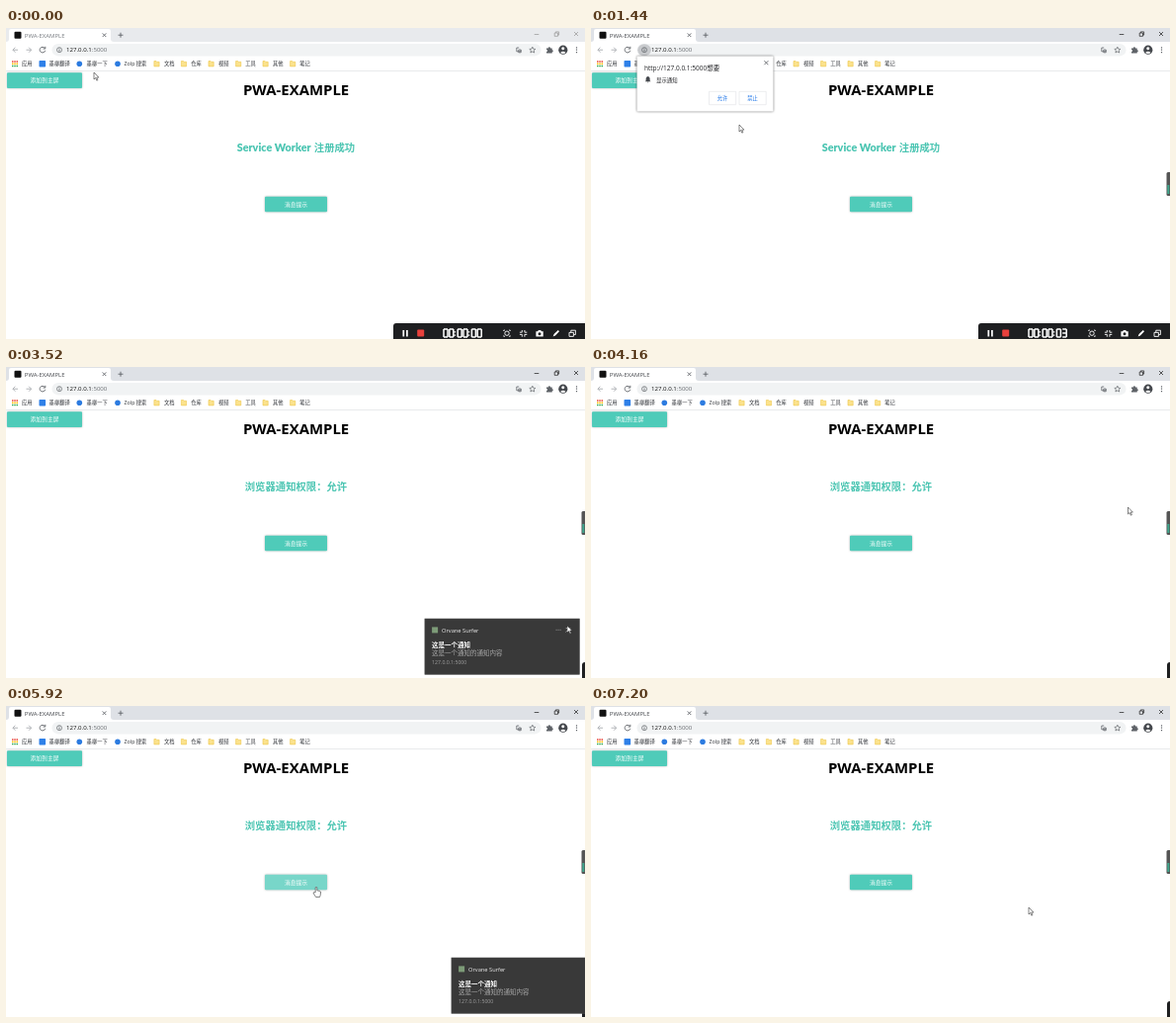
An HTML page that plays this animation: 586x315 px, repeating every 7360 ms.

```html
<!DOCTYPE html>
<html lang="zh">
<head>
<meta charset="utf-8">
<style>
html, body { margin: 0; width: 586px; height: 315px; overflow: hidden; background: #fff; }
svg { display: block; }
text { font-family: "Open Sans", "Noto Sans CJK SC", "Noto Sans CJK", sans-serif; white-space: pre; }
.mid { text-anchor: middle; }
.bold { font-weight: 700; }
.line { fill: none; stroke: #5f6368; stroke-width: .9; }
.btn { fill: #4fcbb9; filter: drop-shadow(0 .5px 1.2px #0004); }
.btn.hover { fill: #78d6c9; }
.status { fill: #4bc5b2; font-size: 10.35px; font-weight: 700; }
.label { fill: #fff; font-size: 5.8px; font-weight: 500; text-anchor: middle; }
.white { fill: none; stroke: #fff; stroke-width: 1; }
</style>
</head>
<body>
<svg width="586" height="315" viewBox="0 0 586 315">
  <!-- tab strip -->
  <rect id="strip" width="586" height="14"/>
  <path d="M0 14q3 0 3-3V3q0-2 2-2h99q2 0 2 2v8q0 3 3 3z" fill="#fff"/>
  <rect x="8.5" y="3.7" width="7" height="7" rx="1" fill="#111"/>
  <text id="tabTitle" x="18.8" y="9.5" font-size="6">PWA-EXAMPLE</text>
  <path class="line" d="M97.7 5.4l3.6 3.6m0-3.6l-3.6 3.6M113.5 7.2h5m-2.5-2.5v5"/>
  <path id="winButtons" class="line" style="stroke-width:.8" d="M534.7 6.5h4.6M555.2 5h3.3v3.3h-3.3zm1.2 0V3.9h3.2v3.2h-1.1M575 4l4 4m0-4l-4 4"/>

  <!-- toolbar -->
  <path class="line" style="stroke:#a9acb0" d="M12 22.2H7m2.4-2.5L6.9 22.2l2.5 2.5M20.5 22.2h5m-2.4-2.5l2.5 2.5-2.5 2.5"/>
  <path class="line" d="M39.2 20.4a2.8 2.8 0 1 0 .5 2.4M39.8 18.8v2.2h-2.2"/>
  <rect x="46.5" y="16" width="495" height="12.4" rx="6.2" fill="#f1f3f4"/>
  <ellipse id="infoHalo" cx="54" cy="22.2" rx="6.8" ry="6" fill="#c8cacd"/>
  <circle class="line" cx="54" cy="22.2" r="2.5" style="stroke-width:.7"/>
  <path class="line" d="M54 21.8v1.9m0-3.2v.7"/>
  <text x="61" y="24.4" font-size="6.1" fill="#111">127.0.0.1<tspan fill="#6b6f74">:5000</tspan></text>
  <ellipse id="installHalo" cx="519" cy="22.2" rx="7" ry="5.6" fill="#c8cacd"/>
  <path class="line" style="stroke-width:.8" d="M519.2 20h-2.4v3.8h4v-1.2M518.8 22h2.4v2.8h-2.4z"/>
  <path class="line" style="stroke-width:.7" d="M532.8 19.2l.9 2 2.1.2-1.6 1.5.5 2.1-1.9-1.1-1.9 1.1.5-2.1-1.6-1.5 2.1-.2z"/>
  <path d="M547 20.4h1.8a1.1 1.1 0 0 1 2.2 0h1.7v1.8a1.1 1.1 0 0 1 0 2.2v1H547v-1.5a1 1 0 0 0 0-2z" fill="#5f6368"/>
  <circle cx="563.8" cy="22.2" r="4.6" fill="#45484d"/>
  <path d="M563.8 19.2a1.5 1.5 0 1 1-.1 0zM561 25q2.8-2.3 5.6 0-2.8 2-5.6 0" fill="#fff"/>
  <path d="M577.5 19.2v6" stroke="#5f6368" stroke-width="1.2" stroke-dasharray="1.2 1.2"/>

  <g id="bookmarks" font-size="5.3" fill="#303338"></g>
  <path d="M0 43.5h586" stroke="#e3e5e8" stroke-width=".8"/>

  <!-- page -->
  <rect id="addBtn" class="btn" x="1" y="45.3" width="76" height="15.7" rx="1"/>
  <text class="label" x="39" y="55.2">添加到主屏</text>
  <text class="mid bold" x="293.6" y="67.9" font-size="14.95">PWA-EXAMPLE</text>
  <g id="ready" class="status">
    <text x="233.7" y="125.2" style="font:900 10.8px Lato,sans-serif">Service Worker</text>
    <text x="311.8" y="125.2">注册成功</text>
  </g>
  <text id="granted" class="status mid" x="293.5" y="125.2">浏览器通知权限：允许</text>
  <rect id="msgBtn" class="btn" x="262" y="170.8" width="63" height="15.4" rx="1"/>
  <text class="label" x="293.5" y="180.8">消息提示</text>

  <!-- permission prompt -->
  <g id="prompt">
    <rect x="46.5" y="28.5" width="138" height="56" rx="1" fill="#fff" style="filter:drop-shadow(0 .6px 1px #0009)"/>
    <text x="54" y="42.8" font-size="6.5" fill="#202124">http://127.0.0.1:5000想要</text>
    <path class="line" d="M175.4 33.2l4 4m0-4l-4 4"/>
    <path d="M54.8 54.2l.8-1v-2q0-2 2-2.2 2 .2 2 2.2v2l.8 1zM56.8 54.8h1.6l-.8.8z" fill="#45484d"/>
    <text x="66" y="54.6" font-size="5.4" fill="#202124">显示通知</text>
    <path d="M119.5 64.3h27.2v13.4h-27.2zM150 64.3h27.2v13.4H150z" fill="#fff" stroke="#dfe1e5" stroke-width=".6"/>
    <g class="mid" font-size="5.3" fill="#1a73e8"><text x="133" y="73">允许</text><text x="163.6" y="73">禁止</text></g>
  </g>

  <!-- edge handle and recorder -->
  <g id="handle">
    <path d="M586 146h-2q-1.5 0-1.5 1.5v21q0 1.5 1.5 1.5h2z" fill="#555"/>
    <path d="M584.3 159v9" stroke="#3fa78d" stroke-width="2"/>
  </g>
  <g id="recorder">
    <path d="M392 315v-13q0-3 3-3h191v16z" fill="#1e1f21"/>
    <path d="M402.3 306v6.4m3.6-6.4v6.4" stroke="#fff" stroke-width="1.7"/>
    <rect x="416.2" y="305.6" width="7" height="7" rx="1" fill="#e8413c"/>
    <path id="clock" class="white" style="stroke-width:1.5"/>
    <g class="white" style="stroke-width:.9">
      <circle cx="507" cy="309.2" r="2.2"/><path d="M503.8 306v1m0 4.4v1M510.2 306v1m0 4.4v1M503.8 306h1m4.4 0h1m-6.4 6.4h1m4.4 0h1"/>
      <path d="M522.3 306v2.2h-2.4m5-2.2v2.2h2.4m-5 4.6v-2.4h-2.4m5 2.4v-2.4h2.4"/>
      <path d="M570 308.4h4.4v4H570zm1.8-.2v-2h4.6v4.4h-1.8"/>
    </g>
    <path d="M536.4 307.2h1.7l.9-1.2h2.1l.9 1.2h1.7v5.2h-7.3z" fill="#fff"/><circle cx="540" cy="309.7" r="1.5" fill="#1e1f21"/>
    <path d="M553.6 312.4l1-2.4 4.2-4 1.2 1.2-4 4.2z" fill="#fff"/>
  </g>

  <!-- notification, laid out from its left edge -->
  <g id="toast">
    <rect x=".3" y="255" width="156.5" height="56.3" fill="#393939" stroke="#4b4b4b" stroke-width=".6"/>
    <rect x="7.5" y="263.4" width="6" height="6" fill="#7d9b78"/>
    <text x="17.5" y="268.6" font-size="5.7" fill="#eee">Orvane Surfer</text>
    <path id="dots" d="M133 266.3h5" stroke="#999" stroke-width=".9" stroke-dasharray="1 1"/>
    <path id="toastClose" class="line" d="M143.2 264l4.4 4.4m0-4.4l-4.4 4.4"/>
    <text class="bold" x="7.5" y="283.5" font-size="6.5" fill="#fff">这是一个通知</text>
    <text x="7.5" y="292" font-size="6.5" fill="#a8a8a8">这是一个通知的通知内容</text>
    <text x="7.5" y="301.2" font-size="5.2" fill="#a0a0a0">127.0.0.1:5000</text>
  </g>

  <g id="cursor" fill="#fff" stroke="#333" stroke-width=".6" stroke-linejoin="round">
    <path id="arrow" d="M0 0v7l1.6-1.5 1.2 2.7 1.1-.5-1.2-2.6h2.2z"/>
    <path id="hand" d="M-.8 5.8V.8q.8-1.4 1.6 0v3l3 .7q.9.3.8 1.4l-.5 3-.6 1.6H-.4l-2.3-3.6q-.6-1.4.6-1.3z"/>
  </g>
</svg>
<script>
const $ = id => document.getElementById(id);
const LOOP = 7360, STEP = 160;

// [icon, icon centre, text start, label]
const bookmarks = [
  ['grid', 9, 16, '应用'], ['square', 36.8, 43.6, '墨柳翻译'], ['circle', 74.3, 81.6, '墨柳一下'],
  ['circle', 113, 119.6, 'Zolp 搜索'], ['folder', 152.5, 160, '文档'], ['folder', 180, 187.3, '仓库'],
  ['folder', 207.6, 215, '视频'], ['folder', 235.2, 242.3, '工具'], ['folder', 262.6, 270, '其他'],
  ['folder', 290.2, 297.3, '笔记']
];
const icons = {
  grid: ['#ea4335', '#fbbc04', '#34a853'].map((c, i) =>
    `<path d="M-3 ${i * 2.2 - 2.2}h6" stroke="${c}" stroke-width="1.5" stroke-dasharray="1.5 .75"/>`).join(''),
  square: '<rect x="-3.3" y="-3.3" width="6.6" height="6.6" rx=".8" fill="#2f80e8"/>',
  circle: '<circle r="2.8" fill="#2c7be0"/>',
  folder: '<path d="M-2.6-2.7h2.1l.7.8h2.4v4.6h-5.2z" fill="#fbe28c" stroke="#ecc64c" stroke-width=".6"/>'
};
$('bookmarks').innerHTML = bookmarks.map(([icon, cx, x, label]) =>
  `<g transform="translate(${cx} 36.2)">${icons[icon]}</g><text x="${x}" y="38.2">${label}</text>`).join('');

// cursor stops: [time, x, y]
const stops = [
  [0, 89, 45], [160, 89, 45], [640, 293, 180], [800, 293, 180], [1440, 150, 98],
  [1680, 133, 71], [1840, 133, 71], [2080, 141.8, 94], [2400, 141.8, 94], [3360, 568, 262],
  [3840, 568, 262], [4480, 519, 22], [4640, 519, 22], [4960, 522, 92], [5280, 40, 53],
  [5440, 40, 53], [5760, 314, 183], [6080, 314, 183], [6560, 568, 262], [6720, 568, 262],
  [7200, 443, 204], [LOOP, 443, 204]
];
function cursorAt(t) {
  const i = stops.findIndex(s => s[0] > t);
  const [t0, x0, y0] = stops[i - 1], [t1, x1, y1] = stops[i];
  const p = (t - t0) / (t1 - t0), e = p * p * (3 - 2 * p);
  return [x0 + (x1 - x0) * e, y0 + (y1 - y0) * e];
}

// notification visits: [start of entry, start of exit]
const visits = [[1920, 3680], [5760, 6720]];
function toastX(t) {
  const visit = visits.find(([a, b]) => t >= a && t < b + 320);
  if (!visit) return 600;
  const [a, b] = visit, out = Math.max(0, (t - b) / 320);
  return 423.6 + 163 * (Math.exp((a - t) / 89) + out * out);
}

// seven-segment digits
const segs = { a: 'h4', b: 'm4 0v4', c: 'm4 4v4', d: 'm0 8h4', e: 'm0 4v4', f: 'v4', g: 'm0 4h4' };
const digits = ['abcdef', 'bc', 'abged', 'abgcd', 'fgbc', 'afgcd'];
function clockPath(seconds) {
  let x = 443, d = '';
  for (const ch of '00:00:0' + seconds) {
    if (ch === ':') {
      d += `M${x - .2} 307.3v1.2m0 2v1.2`;
      x += 2.6;
    } else {
      for (const s of digits[ch]) d += `M${x} 305${segs[s]}`;
      x += 5.8;
    }
  }
  return d;
}

const show = (id, on) => $(id).setAttribute('visibility', on ? 'visible' : 'hidden');
const move = (id, x, y = 0) => $(id).setAttribute('transform', `translate(${x} ${y})`);
const between = (t, a, b) => t >= a && t < b;

function draw(t) {
  const active = !(t < 640 || between(t, 3680, 4000) || between(t, 6880, 7040));
  $('strip').setAttribute('fill', active ? '#dee1e6' : '#e8eaed');
  $('tabTitle').setAttribute('fill', active ? '#45484d' : '#777b80');
  $('winButtons').style.stroke = active ? '#333' : '#a0a0a0';

  const asking = between(t, 800, 1840), granted = t >= 1840;
  show('prompt', asking);
  show('infoHalo', asking);
  show('ready', !granted);
  show('granted', granted);
  show('installHalo', between(t, 4480, 5280));
  show('handle', t >= 640);

  const slide = Math.min(1, Math.max(0, (t - 2240) / 455));
  move('recorder', 191 * slide);
  $('clock').setAttribute('d', clockPath(Math.min(5, Math.floor(t / 480))));

  const [x, y] = cursorAt(t), left = toastX(t);
  move('toast', left);
  const overToast = x > left && y > 255;
  show('dots', overToast);
  $('toastClose').style.stroke = overToast ? '#ddd' : '#999';

  const overAdd = x < 77 && between(y, 45, 61);
  const overMsg = between(x, 262, 325) && between(y, 171, 186);
  $('addBtn').classList.toggle('hover', overAdd);
  $('msgBtn').classList.toggle('hover', overMsg);
  move('cursor', x, y);
  show('hand', overAdd || overMsg);
  show('arrow', !(overAdd || overMsg));
}

const start = performance.now();
function tick() {
  const t = (performance.now() - start) % LOOP;
  draw(Math.floor(t / STEP) * STEP);
  requestAnimationFrame(tick);
}
tick();
</script>
</body>
</html>
```
